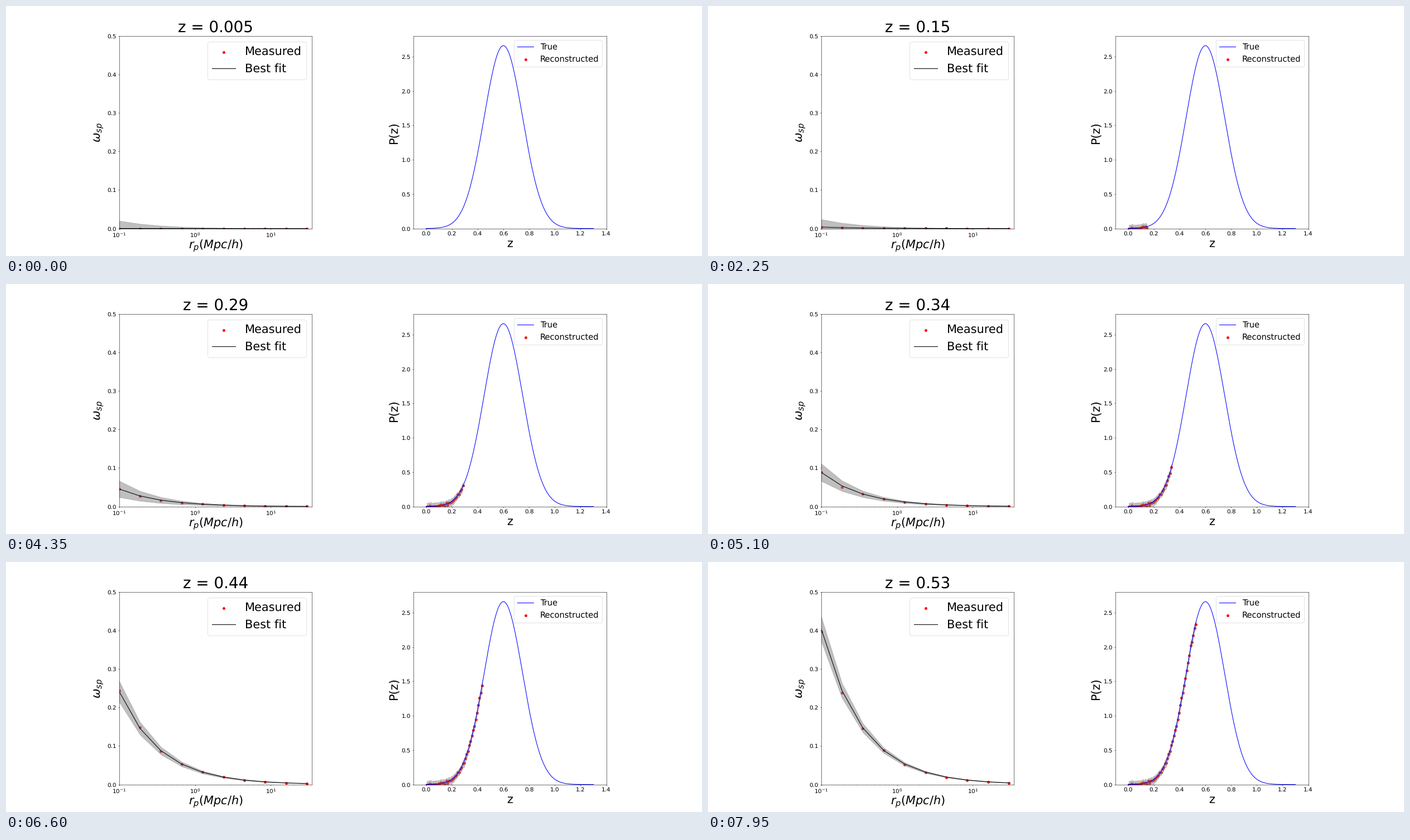
A matplotlib script that plays this animation: 1247 by 449 pixels, repeating every 8 s.

```python
import numpy as np
import matplotlib.pyplot as plt
from matplotlib.animation import FuncAnimation

STEP_MS, TICK_MS, LOOP_MS = 150, 50, 8000
STEPS = -(-LOOP_MS // STEP_MS)

plt.rcParams["text.hinting"] = "none"

rng = np.random.default_rng(4)
z = np.arange(0.005, 1.3, 0.01)[:STEPS]
rp = np.logspace(-1, np.log10(30), 10)
shape = (rp / 0.1) ** -0.8


def p_true(x):
    return np.exp(-0.5 * ((x - 0.6) / 0.15) ** 2) / (0.15 * np.sqrt(2 * np.pi))


# Reconstructed distribution: the true curve plus small scatter
p = p_true(z)
p_rec = np.maximum(p + rng.normal(0, 0.008 + 0.006 * p), 0)
p_err = rng.normal(0.05, 0.005, STEPS)

# Clustering signal: a power law whose amplitude follows P(z)
amplitude = (0.0955 + 0.134 * z) * p
spread = rng.normal(1, 0.025, (STEPS, len(rp)))


def band(x, y, err):
    if len(x) == 0:
        return []
    lower = np.column_stack([x, y - err])
    upper = np.column_stack([x, y + err])
    return [np.vstack([lower, upper[::-1]])]


fig, (left, right) = plt.subplots(1, 2, figsize=(24.94, 8.98), dpi=50)
for ax in (left, right):
    ax.set_box_aspect(1)
    ax.tick_params(labelsize=15)

measured = left.scatter(rp, 0 * rp, color="red", label="Measured")
fit_line, = left.plot(rp, 0 * rp, color="black", label="Best fit")
fit_band = left.fill_between(rp, 0 * rp, 0 * rp, color="gray", alpha=0.5)
left.set_xscale("log")
left.set_xlim(0.1, 35)
left.set_ylim(0, 0.5)
left.set_xlabel(r"$r_p (Mpc/h)$", fontsize=30, labelpad=0)
left.set_ylabel(r"$\omega_{sp}$", fontsize=30)
left.legend(fontsize=30, loc="upper right")
title = left.set_title("", fontsize=40)

grid = np.linspace(0, 1.3, 261)
right.plot(grid, p_true(grid), color="blue", label="True")
rec = right.scatter(z, p_rec, color="red", label="Reconstructed")
rec_band = right.fill_between(z, p_rec, p_rec, color="gray", alpha=0.5)
right.set_xlim(-0.1, 1.4)
right.set_ylim(0, 2.8)
right.set_xlabel("z", fontsize=30)
right.set_ylabel("P(z)", fontsize=30)
right.legend(fontsize=21, loc="upper right")


def update(i):
    k = i * TICK_MS // STEP_MS
    title.set_text(f"z = {z[k]:.2}")
    fit = amplitude[k] * shape
    err = (0.02 + 0.03 * amplitude[k]) * shape
    measured.set_offsets(np.column_stack([rp, fit * spread[k]]))
    fit_line.set_ydata(fit)
    fit_band.set_verts(band(rp, fit, err))
    rec.set_offsets(np.column_stack([z[:k], p_rec[:k]]))
    rec_band.set_verts(band(z[:k], p_rec[:k], p_err[:k]))
    return title, measured, fit_line, fit_band, rec, rec_band


anim = FuncAnimation(fig, update, frames=LOOP_MS // TICK_MS, interval=TICK_MS,
                     init_func=lambda: update(0), repeat=True, repeat_delay=0)
plt.show()
```
